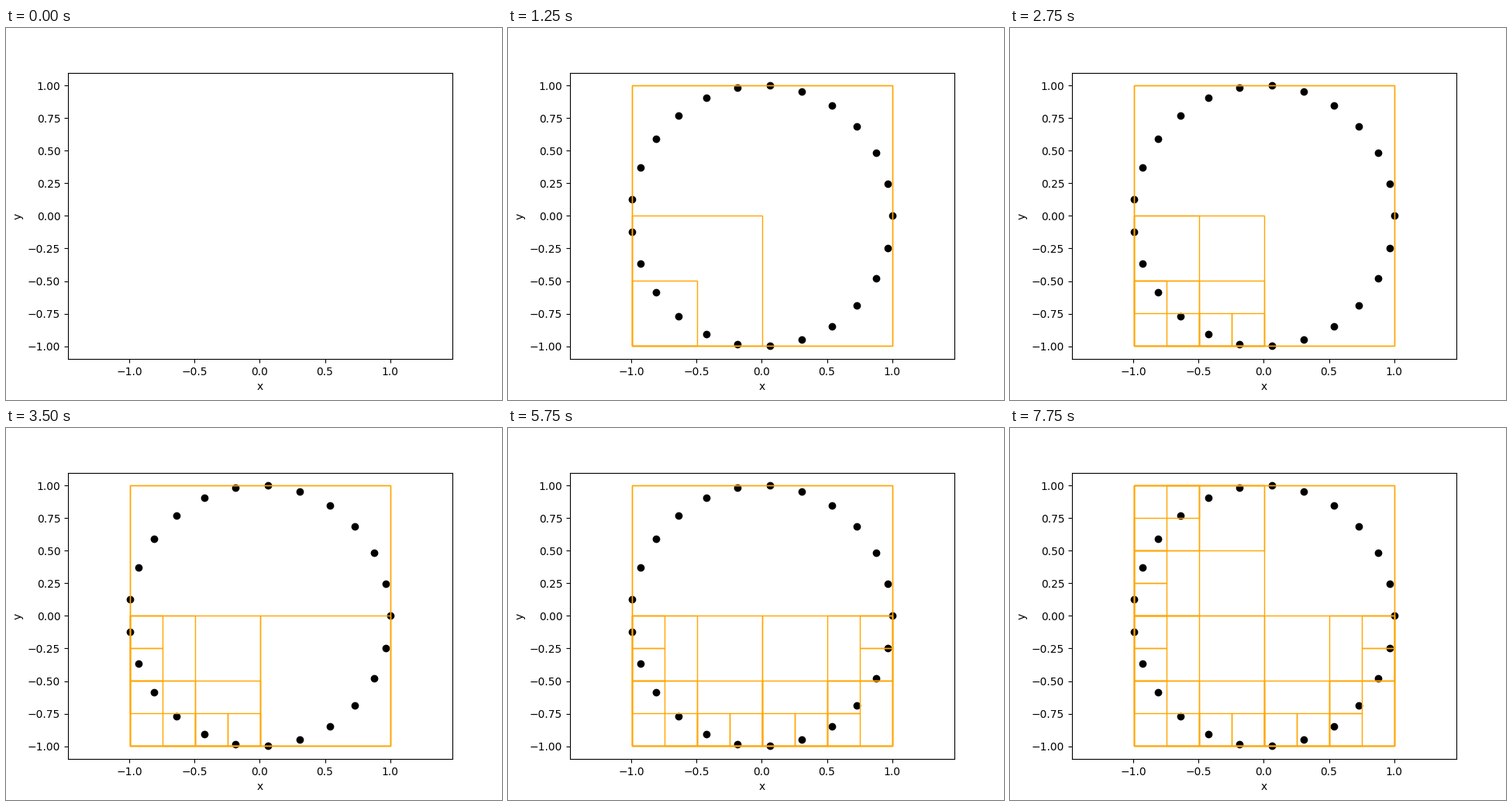
A matplotlib script that plays this animation: 640 by 480 pixels, repeating every 8000 ms.

```python
import numpy as np
import matplotlib.pyplot as plt
from matplotlib.animation import FuncAnimation
from matplotlib.patches import Rectangle

FRAMES = 32
INTERVAL = 250
EPS = 1e-9  # keeps points on a split line in the upper / right cell

angles = 2 * np.pi * np.arange(25) / 25
points = np.column_stack([np.cos(angles), np.sin(angles)])


def cells(pts, x, y, w, h):
    """Yield the occupied quadtree cells depth first, bottom row first."""
    yield x, y, w, h
    if len(pts) < 2:
        return
    w, h = w / 2, h / 2
    right = pts[:, 0] > x + w - EPS
    top = pts[:, 1] > y + h - EPS
    for row in (0, 1):
        for col in (0, 1):
            inside = pts[(right == col) & (top == row)]
            if len(inside):
                yield from cells(inside, x + col * w, y + row * h, w, h)


low, high = points.min(axis=0), points.max(axis=0)
size = high - low
bounds = (*low, *size)
# The bounding box comes first, then the tree starting at its root
boxes = ([bounds] + list(cells(points, *bounds)))[:FRAMES - 2]

fig, ax = plt.subplots(figsize=(6.4, 4.8), dpi=100)
dots = ax.scatter(points[:, 0], points[:, 1], color="black")
rects = [
    ax.add_patch(Rectangle((x, y), w, h, fill=False, edgecolor="orange", linewidth=1))
    for x, y, w, h in boxes
]

# Equal scale on both axes, 5 % margin above and below
mid = (low + high) / 2
half_h = 0.55 * size[1]
half_w = half_h * (0.775 * 640) / (0.77 * 480)
ax.set_xlim(mid[0] - half_w, mid[0] + half_w)
ax.set_ylim(mid[1] - half_h, mid[1] + half_h)
ax.set_xlabel("x")
ax.set_ylabel("y")


def update(frame):
    dots.set_visible(frame >= 1)
    for i, rect in enumerate(rects):
        rect.set_visible(frame >= i + 2)
    return [dots, *rects]


def reset():
    return update(0)


anim = FuncAnimation(fig, update, frames=FRAMES, init_func=reset,
                     interval=INTERVAL, repeat=True, repeat_delay=0, blit=False)
plt.show()
```
